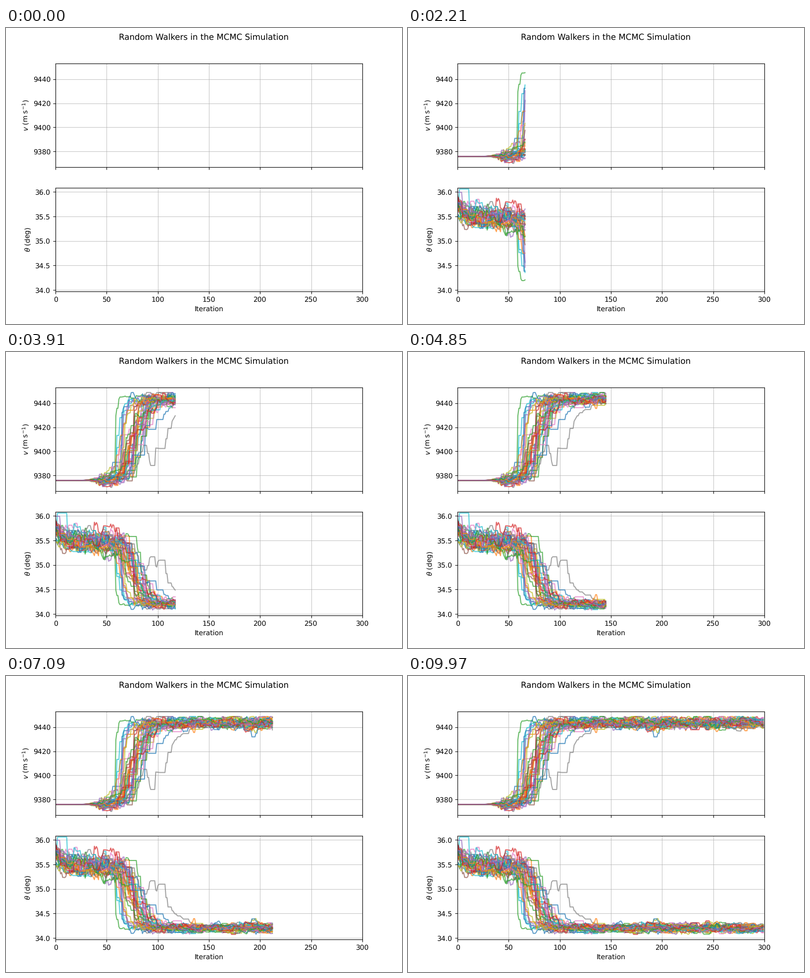
Recreate the animation shown at these times as a matplotlib script. Size 800 px wide and 600 px high, loop 10 s.

```python
import numpy as np
import matplotlib.pyplot as plt
from matplotlib.animation import FuncAnimation

WALKERS, STEPS = 35, 300
V_START, V_END = 9376.0, 9443.4
ANGLE_START, SLOPE = 35.47, -0.0188

# Walkers that climb ahead of the crowd, with the iteration they do it at.
LEADERS = {12: 54, 20: 58, 19: 60, 14: 64}
STRAGGLER, WANDERER, HIGH_START = 27, 30, 9

rng = np.random.default_rng(11)
t = np.arange(STEPS)


def smooth_noise(rho):
    z = rng.normal(size=(WALKERS, STEPS))
    for k in range(1, STEPS):
        z[:, k] = rho * z[:, k - 1] + np.sqrt(1 - rho ** 2) * z[:, k]
    return z


def climb():
    """Progress of each walker from the start to the settled band, 0 to 1."""
    centre = np.clip(rng.normal(74, 7, WALKERS), 60, 88)
    width = rng.uniform(3, 6, WALKERS)
    for i, when in LEADERS.items():
        centre[i], width[i] = when, 1.6
    x = (t - centre[:, None]) / width[:, None]
    x = np.where(x > 0, x / 1.6, x)  # slower arrival than departure
    return 1 / (1 + np.exp(-x))


def simulate():
    rise = climb()
    steep = rise * (1 - rise)
    spread = np.minimum(np.exp(0.22 * (t - 39)), 2.4) + 18 * steep
    v = V_START + (V_END - V_START) * rise + spread * smooth_noise(0.86)
    v[WANDERER] -= 9 * np.exp(-((t - 193) / 7) ** 2)
    v[STRAGGLER, 62:138] = np.interp(
        t[62:138],
        [62, 79, 86, 88, 94, 96, 106, 110, 118, 137],
        [9378, 9387, 9405, 9405, 9385, 9403, 9402, 9419, 9431, 9441])
    v = np.clip(v, 9370, 9448.8)

    # A rejected proposal leaves the walker where it was.
    moved = rng.random((WALKERS, STEPS)) < 0.5 - 0.8 * steep
    held = np.maximum.accumulate(np.where(moved, t, 0), axis=1)
    v = np.take_along_axis(v, held, 1)

    # Both parameters slide along one ridge, with scatter that narrows.
    left = np.clip((9440 - v) / 64, 0, 1)
    scatter = np.take_along_axis(smooth_noise(0.9), held, 1)
    angle = ANGLE_START + SLOPE * (v - V_START) + 0.25 * np.exp(-held / 6)
    angle += (0.015 + 0.11 * left) * scatter
    angle[HIGH_START, 2:12] = 36.06
    return v, angle


plt.rcParams["text.hinting"] = "none"

fig, axes = plt.subplots(2, 1, sharex=True, figsize=(8, 6), dpi=100)
fig.suptitle("Random Walkers in the MCMC Simulation")
axes[0].set(xlim=(0, STEPS), ylim=(9367.1, 9452.9), ylabel=r"$v$ (m s$^{-1}$)")
axes[1].set(ylim=(33.97, 36.085), ylabel=r"$\theta$ (deg)", xlabel="Iteration")

traces = []
for ax, data in zip(axes, simulate()):
    ax.grid(True, alpha=0.7)
    for i, row in enumerate(data):
        line, = ax.plot([], [], color=f"C{i % 10}", alpha=0.7)
        traces.append((line, row))


def update(n):
    for line, row in traces:
        line.set_data(t[:n + 1], row[:n + 1])
    return [line for line, _ in traces]


anim = FuncAnimation(fig, update, frames=STEPS, interval=10000 / STEPS,
                     repeat=True, repeat_delay=0)
plt.show()
```
